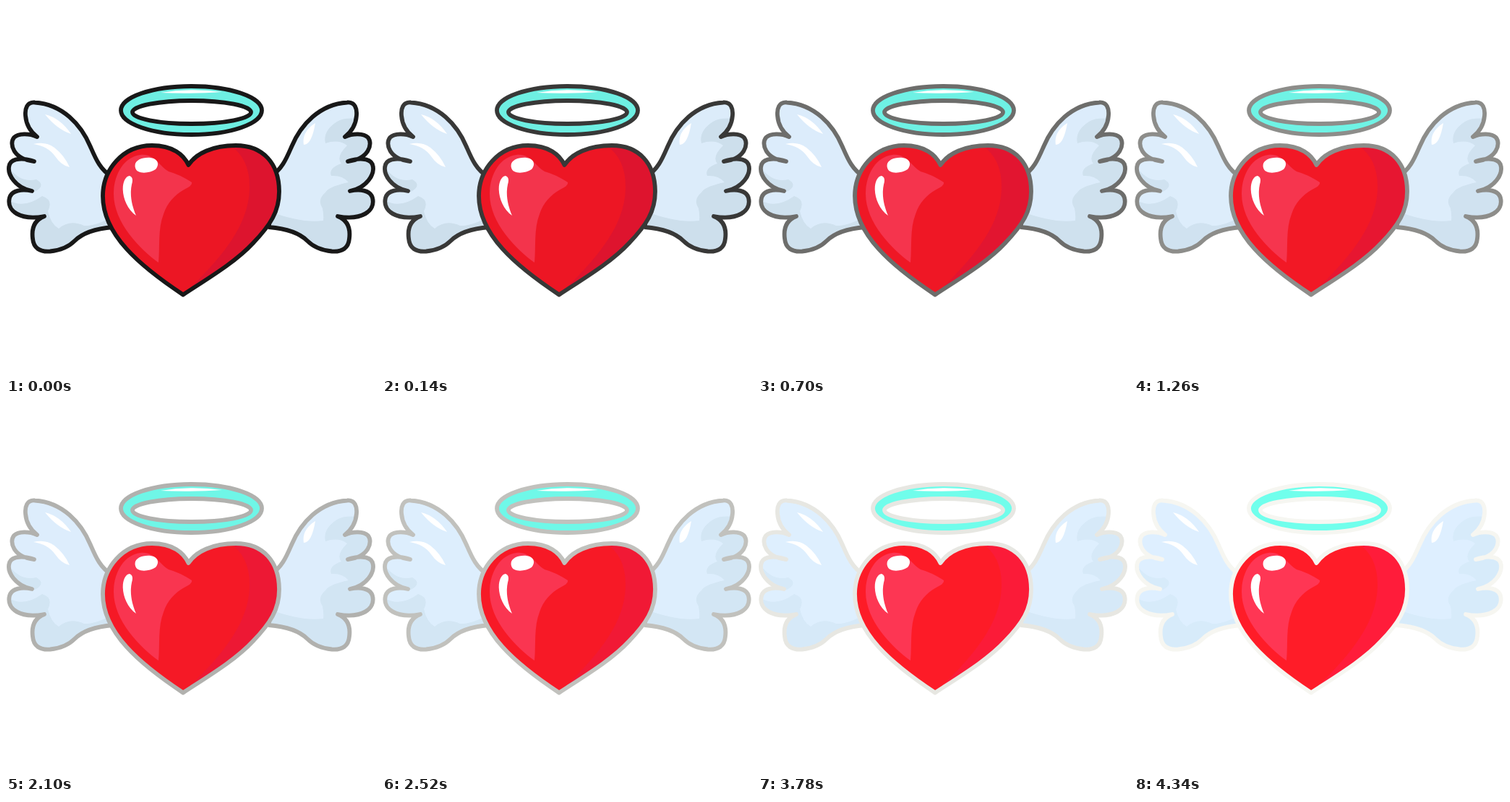
An HTML page that plays this animation: 512x512 px, repeating every 4480 ms.

```html
<!DOCTYPE html>
<html lang="en">
<head>
<meta charset="utf-8">
<title>Winged heart</title>
<style>
  html, body { margin: 0; width: 100%; height: 100%; overflow: hidden; background: #fff; }
  svg { display: block; width: 100vw; height: 100vh; }
  .line { fill: none; stroke: var(--line); stroke-width: 5.8; stroke-linejoin: round; }
  .wing { fill: var(--wing); }
  .wingShade { fill: var(--wingShade); }
  .heart { fill: var(--heart); }
  .heartShade { fill: var(--heartShade); }
  .heartLight { fill: var(--heartLight); }
  .halo { fill: var(--halo); }
  .shine { fill: #fff; }
</style>
</head>
<body>
<svg viewBox="0 0 512 512">
  <defs>
    <path id="wing" d="M146 236 C130 226 124 211 117 195 C104 164 78 136 40 133.500 C29 132.500 26 142 27 152 C28 165 34 174 43 181 C32 176 17 176 11 182 C4 191 10 212 39 215 C25 210 9 210 5 219 C0 233 14 252 36 256 C22 253 8 255 5 265 C0 284 20 297 53 291 C40 296 35 307 37 322 C38 335 47 340.500 61 339.500 C77 338 87 333 95 325 C106 314 124 308 148 306 Z"/>
    <path id="heart" d="M252.500 220 C246 206 231 193 202 193 C161 193 134 227 134 263 C134 316 184 359 245 399.500 C281 376 318 354 342 328 C366 303 378 284 378 257 C378 218 356 193 318 193 C286 193 263 204 252.500 220 Z"/>
    <clipPath id="wingClip"><use href="#wing"/></clipPath>
    <clipPath id="heartClip"><use href="#heart"/></clipPath>
  </defs>

  <g>
    <use href="#wing" class="wing"/>
    <path class="wingShade" clip-path="url(#wingClip)" d="M0 218 Q18 246 42 240 Q56 248 40 257 L0 250 Z M0 266 Q22 283 50 263 Q66 268 58 284 Q62 302 73 308 Q88 295 108 304 Q124 305 150 290 V345 H0 Z"/>
    <use href="#wing" class="line"/>
  </g>
  <g transform="matrix(-1 0 0 1 512 0)">
    <use href="#wing" class="wing"/>
    <path class="wingShade" clip-path="url(#wingClip)" d="M20 157 Q42 153 54 160 Q74 173 70 190 Q52 184 40 193 Q56 209 48 218 Q66 224 62 235 Q46 234 38 244 Q66 250 70 258 Q82 268 74 280 Q72 290 73 297 Q103 301 148 284 V345 H0 V157 Z"/>
    <use href="#wing" class="line"/>
  </g>
  <path class="shine" d="M54 150 Q75 155 90 177 Q71 171 54 150 Z M38 191 Q55 187 67 196 Q81 207 88 223 Q77 221 68 208 Q58 194 38 191 Z M428 162 Q409 174 412 192 Q423 192 428 162 Z"/>

  <use href="#heart" class="heart"/>
  <g clip-path="url(#heartClip)">
    <path class="heartShade" d="M305 190 Q337 207 337 250 C337 302 301 346 245 400 L390 380 V190 Z"/>
    <path class="heartLight" d="M186 206 C206 204 212 222 225 229 Q240 233 257 244 Q258 248 252 251 C236 259 224 270 218 288 C210 308 213 332 211 355 C186 337 149 300 149 260 C149 235 162 209 186 206 Z"/>
  </g>
  <path class="shine" d="M179 224 C176 214 188 209 200 210 C210 211 213 219 207 226 C198 232 181 233 179 224 Z M171 235 Q177 237 174 247 C171 261 174 276 180 290 C164 279 158 254 164 241 Q167 235 171 235 Z"/>
  <use href="#heart" class="line"/>

  <path class="halo" fill-rule="evenodd" d="M159 144.500 a97.500 33.500 0 1 1 195 0 a97.500 33.500 0 1 1 -195 0 Z M175 147 a82 16 0 1 0 164 0 a82 16 0 1 0 -164 0 Z"/>
  <ellipse class="line" cx="256.500" cy="144.500" rx="97.500" ry="33.500"/>
  <ellipse class="line" cx="257" cy="147" rx="82" ry="16"/>
  <path class="shine" d="M214 120 Q255 113 299 119 Q254 122 214 120 Z"/>
</svg>
<script>
  const STEP = 140, STEPS = 32, GAMMA = 2.2;
  const fades = {
    wing: [[220, 236, 250], [222, 239, 255]],
    wingShade: [[205, 223, 236], [215, 235, 250]],
    heart: [[236, 22, 36], [255, 28, 40]],
    heartShade: [[221, 20, 46], [255, 28, 58]],
    heartLight: [[243, 52, 76], [255, 54, 84]],
    halo: [[110, 238, 226], [112, 255, 236]]
  };
  const style = document.documentElement.style;
  const start = performance.now();
  const mix = (a, b, p) => a + (b - a) * p;
  const setColor = (name, rgb) => style.setProperty("--" + name, `rgb(${rgb.map(Math.round)})`);

  // The outline brightens evenly in linear light.
  const outline = p => [246, 246, 241].map(end =>
    mix((24 / 255) ** GAMMA, (end / 255) ** GAMMA, p) ** (1 / GAMMA) * 255);

  function draw(now) {
    const step = Math.floor(Math.max(0, now - start) / STEP) % STEPS;
    const p = step / (STEPS - 1);
    setColor("line", outline(p));
    for (const [name, [from, to]] of Object.entries(fades))
      setColor(name, from.map((v, i) => mix(v, to[i], p)));
    requestAnimationFrame(draw);
  }
  draw(start);
</script>
</body>
</html>
```
